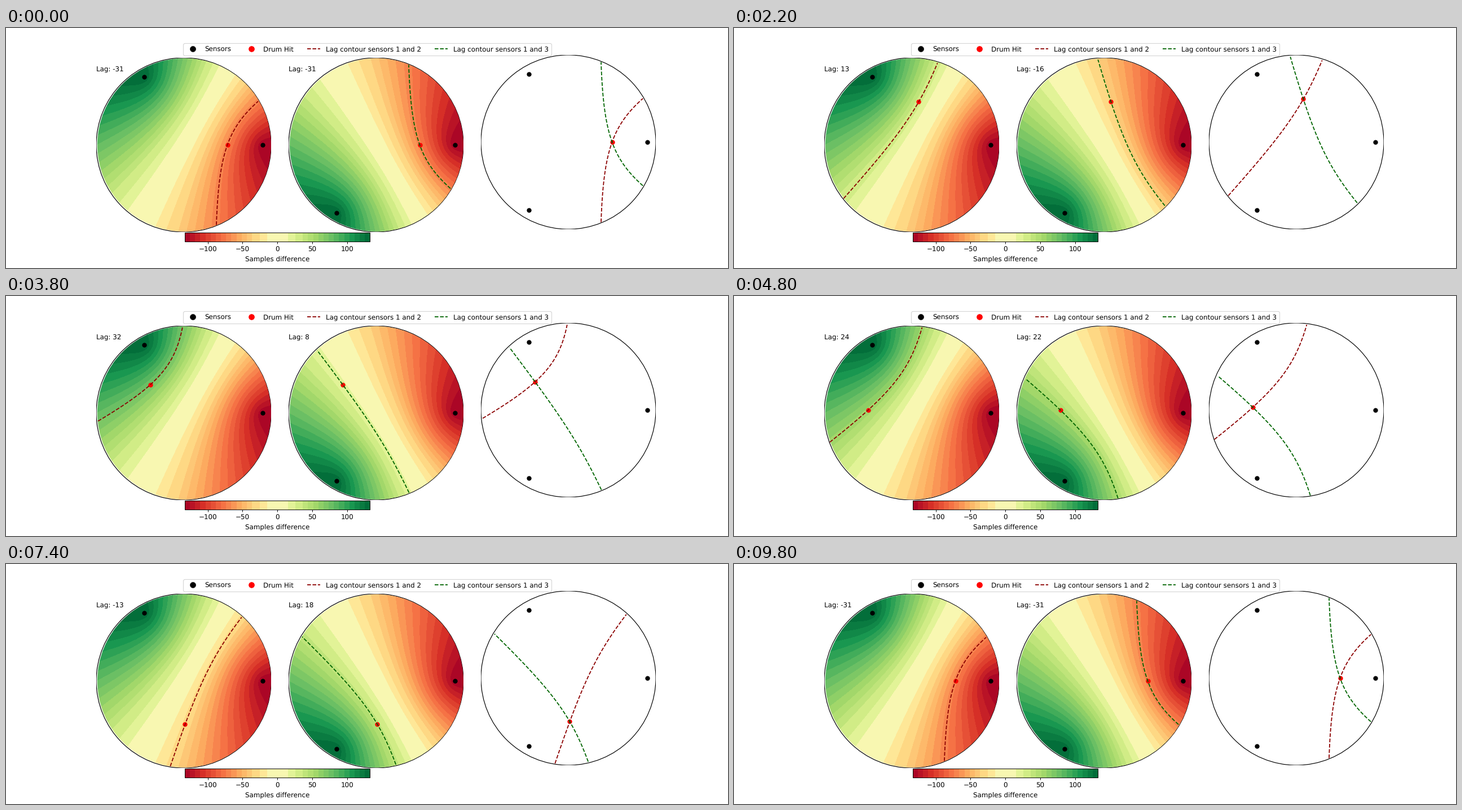
Animation, 1280 px wide and 427 px high, one loop 10000 ms. Source, as a matplotlib script:

```python
import numpy as np
import matplotlib.pyplot as plt
from matplotlib.animation import FuncAnimation
from matplotlib.lines import Line2D
from matplotlib.patches import Circle

WIDTH, HEIGHT = 1280, 427
DPI = WIDTH / 15
FRAMES, INTERVAL = 50, 200
FIELD_SCALE = 85.34   # samples per drum radius in the colour maps
LAG_SCALE = 37.33     # samples per drum radius in the printed lags
GRID = 100

plt.rcParams.update({"font.family": "DejaVu Sans", "font.size": 10,
                     "text.hinting": "no_hinting"})

fig = plt.figure(figsize=(WIDTH / DPI, HEIGHT / DPI), dpi=DPI, facecolor="white")


def pixel_axes(left, top, width, height):
    return fig.add_axes([left / WIDTH, 1 - (top + height) / HEIGHT,
                         width / WIDTH, height / HEIGHT])


angles = np.radians([0, 120, 240])
sensors = 0.9 * np.column_stack([np.cos(angles), np.sin(angles)])


def lag(x, y, other):
    """Difference in distance to the first sensor and to another one."""
    first, second = (np.hypot(x - sx, y - sy) for sx, sy in sensors[[0, other]])
    return first - second


axis = np.linspace(-1, 1, GRID)
X, Y = np.meshgrid(axis, axis)
outside = np.hypot(X, Y) > 1
fields = {i: lag(X, Y, i) for i in (1, 2)}
drum_fields = {i: np.ma.masked_where(outside, f) for i, f in fields.items()}
line_colors = {1: "darkred", 2: "darkgreen"}

# Broad bands around zero, even ones further out.
peak = FIELD_SCALE * 0.9 * np.sqrt(3)
upper = np.concatenate([[15, 25.5], np.linspace(36.5, peak, 14)])
levels = np.concatenate([-upper[::-1], upper])
middles = (levels[:-1] + levels[1:]) / 2
bands = plt.get_cmap("RdYlGn")(0.5 + middles / (2 * peak))
bands[len(bands) // 2] = (0.973, 0.969, 0.694, 1)


def drum(left, top, shown):
    ax = pixel_axes(left, top, 310, 310)
    ax.set(xlim=(-1, 1), ylim=(-1, 1))
    ax.axis("off")
    ax.add_patch(Circle((0, 0), 1, fill=False, color="black", lw=1))
    ax.scatter(*sensors[shown].T, color="black", zorder=3, snap=False)
    return ax


panels = [drum(160, 53, [0, 1]), drum(501, 53, [0, 2]), drum(842, 48, [0, 1, 2])]
shown_lags = [(1,), (2,), (1, 2)]
labels = []
for i, ax in enumerate(panels[:2], start=1):
    values = np.clip(fields[i] * FIELD_SCALE, -peak + 1e-6, peak - 1e-6)
    filled = ax.contourf(X, Y, values, levels=levels, colors=bands)
    filled.set_clip_path(Circle((0.006, 0), 0.994, transform=ax.transData))
    labels.append(ax.text(0, 0.92, "", transform=ax.transAxes))

hits = [ax.scatter([0.5], [0], color="red", zorder=1.5, snap=False) for ax in panels]

bar = fig.colorbar(filled, cax=pixel_axes(317, 364, 328.4, 16.4), spacing="proportional",
                   orientation="horizontal", ticks=range(-100, 101, 50))
bar.set_label("Samples difference")


def dot(color):
    return Line2D([], [], marker="o", color="w", markerfacecolor=color, markersize=10)


handles = [dot("black"), dot("red")]
handles += [Line2D([], [], color=line_colors[i], ls="--") for i in (1, 2)]
fig.legend(handles, ["Sensors", "Drum Hit", "Lag contour sensors 1 and 2",
                     "Lag contour sensors 1 and 3"],
           ncol=4, loc="upper center", borderaxespad=0,
           bbox_to_anchor=(640.5 / WIDTH, 1 - 27.5 / HEIGHT))

contours = []


def update(frame):
    while contours:
        contours.pop().remove()
    angle = 2 * np.pi * frame / (FRAMES - 1)
    x, y = 0.5 * np.cos(angle), 0.5 * np.sin(angle)
    for ax, hit, indices in zip(panels, hits, shown_lags):
        hit.set_offsets([(x, y)])
        for i in indices:
            contours.append(ax.contour(X, Y, drum_fields[i], levels=[lag(x, y, i)],
                                       colors=line_colors[i], linestyles="--",
                                       linewidths=1.5))
    for i, label in enumerate(labels, start=1):
        label.set_text(f"Lag: {round(LAG_SCALE * lag(x, y, i))}")
    return []


anim = FuncAnimation(fig, update, frames=FRAMES, interval=INTERVAL,
                     init_func=lambda: update(0), repeat=True, repeat_delay=0)
plt.show()
```
